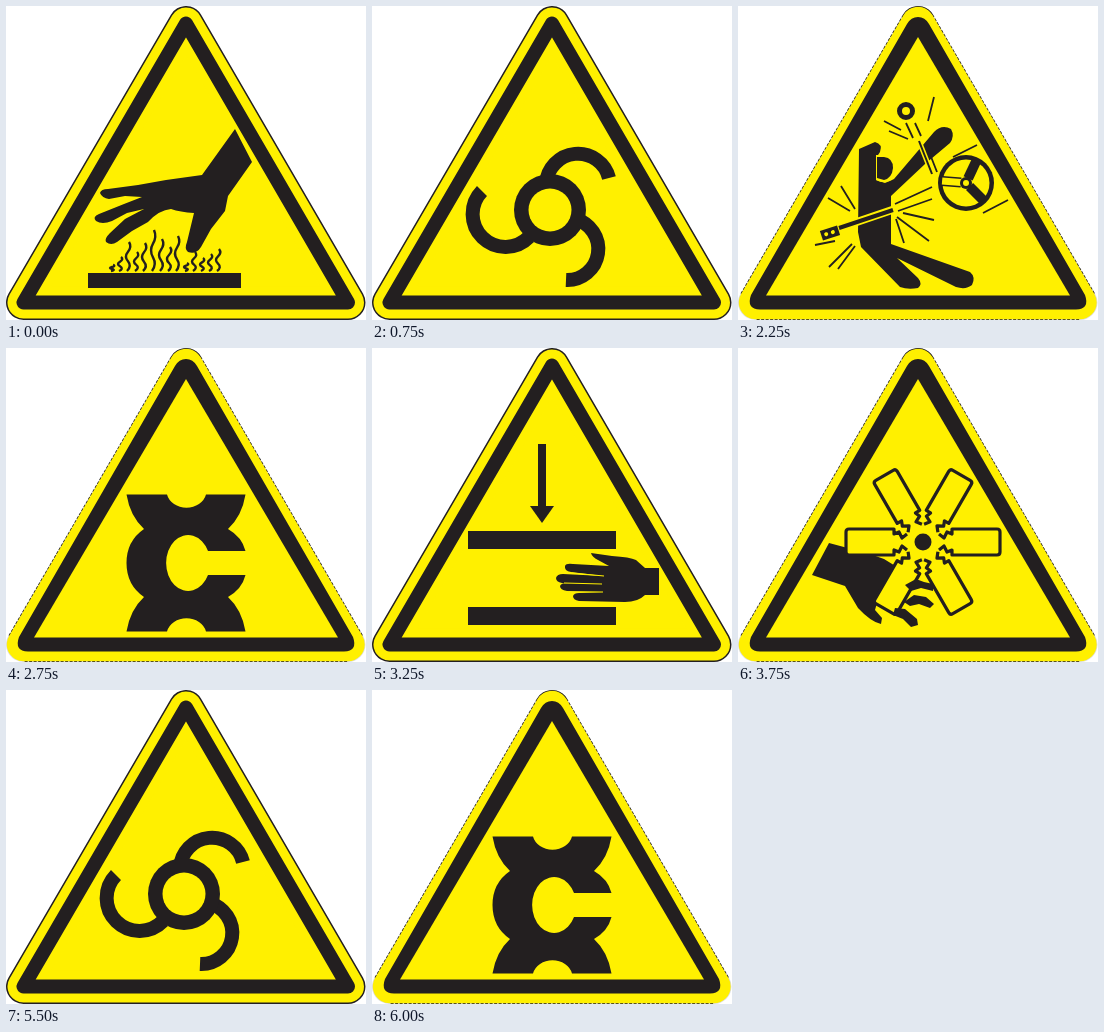
Recreate the animation shown at these times as an HTML page. Size 360 by 314 pixels, loop 6.25 s.

```html
<!DOCTYPE html>
<html lang="en">
<head>
<meta charset="utf-8">
<title>Warning signs</title>
<style>
html, body { margin: 0; width: 100%; height: 100%; overflow: hidden; background: #fff; }
svg { display: block; width: 360px; height: 314px; }
</style>
</head>
<body>
<svg id="stage" viewBox="0 0 360 314" xmlns="http://www.w3.org/2000/svg"></svg>
<script>
const stage = document.getElementById('stage');
const STEP = 250;
const YELLOW = '#fff000', BLACK = '#231f20';

const fill = (d, color = BLACK) => `<path d="${d}" fill="${color}"/>`;
const line = (d, width, color = BLACK) =>
  `<path d="${d}" fill="none" stroke="${color}" stroke-width="${width}"/>`;
const disc = (x, y, r, color = BLACK) => `<circle cx="${x}" cy="${y}" r="${r}" fill="${color}"/>`;
const ring = (x, y, r, width) =>
  `<circle cx="${x}" cy="${y}" r="${r}" fill="none" stroke="${BLACK}" stroke-width="${width}"/>`;
const bar = (x, y, w, h) => `<rect x="${x}" y="${y}" width="${w}" height="${h}" fill="${BLACK}"/>`;
const turn = (angle, x, y, body) => `<g transform="translate(${x} ${y}) rotate(${angle})">${body}</g>`;

// Concentric rounded triangles share one centre line.
const TRIANGLE = 'M180 17.5L17.5 296.5H342Z';
const band = (width, color, inside = 'none', dash = 'none') =>
  `<path d="${TRIANGLE}" fill="${inside}" stroke="${color}" stroke-width="${width}"
    stroke-linejoin="round" stroke-dasharray="${dash}"/>`;

const borders = {
  solid: band(35, BLACK) + band(32, YELLOW, YELLOW) + band(14, BLACK),
  fine: band(35, '#ddd') + band(35, BLACK, 'none', '3 1.5') + band(33.4, YELLOW, YELLOW) +
    fill('M180 11Q187 11 191 18L347 289Q352 303 338 303.5H22Q8 303 13 289L169 18Q173 11 180 11Z') +
    fill('M180 31L28 289.5H332Z', YELLOW),
  dark: band(34, '#151713') + band(30, '#efdf17', '#efdf17') + band(14, '#262d2a')
};

function hotSurface() {
  const wisps = [[105, 259], [113, 251], [121, 236], [129, 246], [137, 237], [146, 224],
    [154, 233], [162, 241], [170, 230], [179, 257], [187, 246], [195, 252], [203, 248], [211, 243]];
  const steam = wisps.map(([x, top]) => {
    const h = (265 - top) / 3;
    return line(`M${x} 265q5 ${-h / 2} 1 ${-h}t0 ${-h}t1 ${-h}`, 2.4);
  }).join('');
  const hand = `M229 123L246 156L222 190L219 205L205 223L195 241Q190 249 182 246Q178 243 181 236
    L188 207Q174 206 165 203Q153 204 142 216L126 225L111 236Q105 240 100 236Q98 233 104 227
    L119 213L138 203L121 207L106 215Q96 219 90 215Q86 211 93 208L118 198L136 191L119 190
    L103 193Q96 192 94 187Q95 183 102 183L132 179L160 174L196 169Z`;
  return steam + fill(hand) + bar(82, 267, 153, 15);
}

function rotor() {
  return line('M174 178A32 32 0 0 1 237 172', 14) +
    line('M203 213A31 31 0 0 1 194 274', 14) +
    line('M110 185A32 32 0 0 0 157 231', 14) +
    disc(178, 204, 36) + disc(178, 204, 21.5, YELLOW);
}

function flyingParts() {
  const body = `M121 143L137 136Q145 138 142 146L138 152V174Q147 179 156 173L196 126
    Q204 118 213 123Q217 130 212 137L187 158L153 190V238L232 266Q238 271 234 279
    Q228 284 218 281L159 252L180 272Q185 278 180 282Q170 284 162 281L123 241L120 226Z`;
  const shards = `M196 91L190 115M146 115L163 124M151 125L170 133M168 117L175 132M177 117L183 130
    M188 138L199 166M215 151L239 139M245 207L270 194M103 180L117 203M90 192L112 205
    M91 261L114 238M100 263L117 240M77 239L97 235M159 211L191 235M165 207L196 214M158 213L166 237
    M157 198L194 181M160 205L194 193`;
  const spoke = (angle, inner) =>
    turn(angle, 228, 177, bar(5, -5, 19, 10) + (inner ? fill('M5 -3.5H24V3.5H5Z', YELLOW) : ''));
  return fill(body) +
    fill('M138 149H147Q158 151 158 163Q156 175 147 177L138 174Z', YELLOW) +
    fill('M139 151H146Q155 152 155 162Q154 172 146 174L139 172Z') +
    line('M181 135L194 168', 5, YELLOW) + line('M181 135L194 168', 2) +
    line('M101 222L157 203', 8, YELLOW) + line('M101 222L155 204', 4) +
    turn(-18, 92, 227, bar(-9, -5, 18, 10) + disc(-4, 0, 2, YELLOW) + disc(3, 0, 2, YELLOW)) +
    line(shards, 1.8) + ring(168, 105, 6.5, 5) +
    disc(228, 177, 28) + disc(228, 177, 23.5, YELLOW) +
    spoke(-65) + spoke(45) + spoke(185, true) + disc(228, 177, 6) + disc(228, 177, 3, YELLOW);
}

function crush() {
  const hand = `M287 220V247H273Q266 254 253 254L207 253Q201 252 201 248Q202 245 207 245
    L231 244L195 243Q188 242 188 238Q189 235 195 235L230 236L190 235Q184 234 184 230
    Q185 226 191 226L231 228L199 224Q192 223 193 218Q194 215 201 216L237 218L226 212
    Q220 209 219 205L240 208Q258 209 264 212L273 220Z`;
  return bar(166, 96, 8, 63) + fill('M158 158H182L170 175Z') +
    bar(96, 183, 148, 18) + bar(96, 259, 148, 18) + fill(hand) +
    line('M200 225L232 228M192 235L230 236M197 244L231 244', 1, YELLOW);
}

function fan() {
  const blade = `<path d="M16 -8L21 -4L24 -10L29 -8V-13H74Q77 -13 77 -10V10Q77 13 74 13H29V8L24 10L21 4L16 8"
    fill="${YELLOW}" stroke="${BLACK}" stroke-width="3.2" stroke-linejoin="round"/>`;
  const blades = [0, 60, 120, 180, 240, 300].map(a => turn(a, 185, 194, blade)).join('');
  const hand = `M91 195L74 227L107 238L120 260Q133 274 143 276L144 270L137 262L139 255
    L156 266L163 250L159 219L146 211L132 206Z`;
  const tips = `M167 237L178 231L186 234L195 236V243L183 240L173 243Z
    M166 254L176 247L188 249L196 256L192 260L181 256L172 258Z
    M157 260L167 261L179 271L180 277L173 279L165 271L155 267Z`;
  return fill(hand) + blades + disc(185, 194, 16, YELLOW) + disc(185, 194, 8.5) + fill(tips);
}

function biohazard() {
  const ink = '#33231e', paper = '#efdf17', angles = [0, 120, 240];
  const each = body => angles.map(a => turn(a, 180, 207, body)).join('');
  return each(disc(0, -39, 48, ink)) + each(disc(0, -51, 35, paper)) +
    each(line('M0 -10V-22', 4, paper)) +
    each(line('M-30 -35A46 46 0 0 1 30 -35', 13, ink)) +
    disc(180, 207, 14, paper);
}

function cutter() {
  return fill(`M120.5 146.5H161A20 17 0 0 0 200 146.5H239.5Q236 168 222 181Q236 189 239.5 203H202
    A22 28 0 1 0 202 227H239.5Q236 241 222 249Q236 262 239.5 283.5H200A20 17 0 0 0 161 283.5H120.5
    Q124 262 138 249Q120.5 237 120.5 215Q120.5 193 138 181Q124 168 120.5 146.5Z`);
}

const signs = [
  borders.solid + hotSurface(),
  borders.solid + rotor(),
  borders.fine + flyingParts(),
  borders.solid + crush(),
  borders.fine + fan(),
  borders.dark + biohazard(),
  borders.fine + cutter()
];
const order = '0301231402160354063524156';

let shown = -1;
function draw(time) {
  const sign = +order[Math.floor(time / STEP) % order.length];
  if (sign === shown) return;
  shown = sign;
  stage.innerHTML = signs[sign];
}

let start;
function tick(now) {
  start ??= now;
  draw(now - start);
  requestAnimationFrame(tick);
}
draw(0);
requestAnimationFrame(tick);
</script>
</body>
</html>
```
